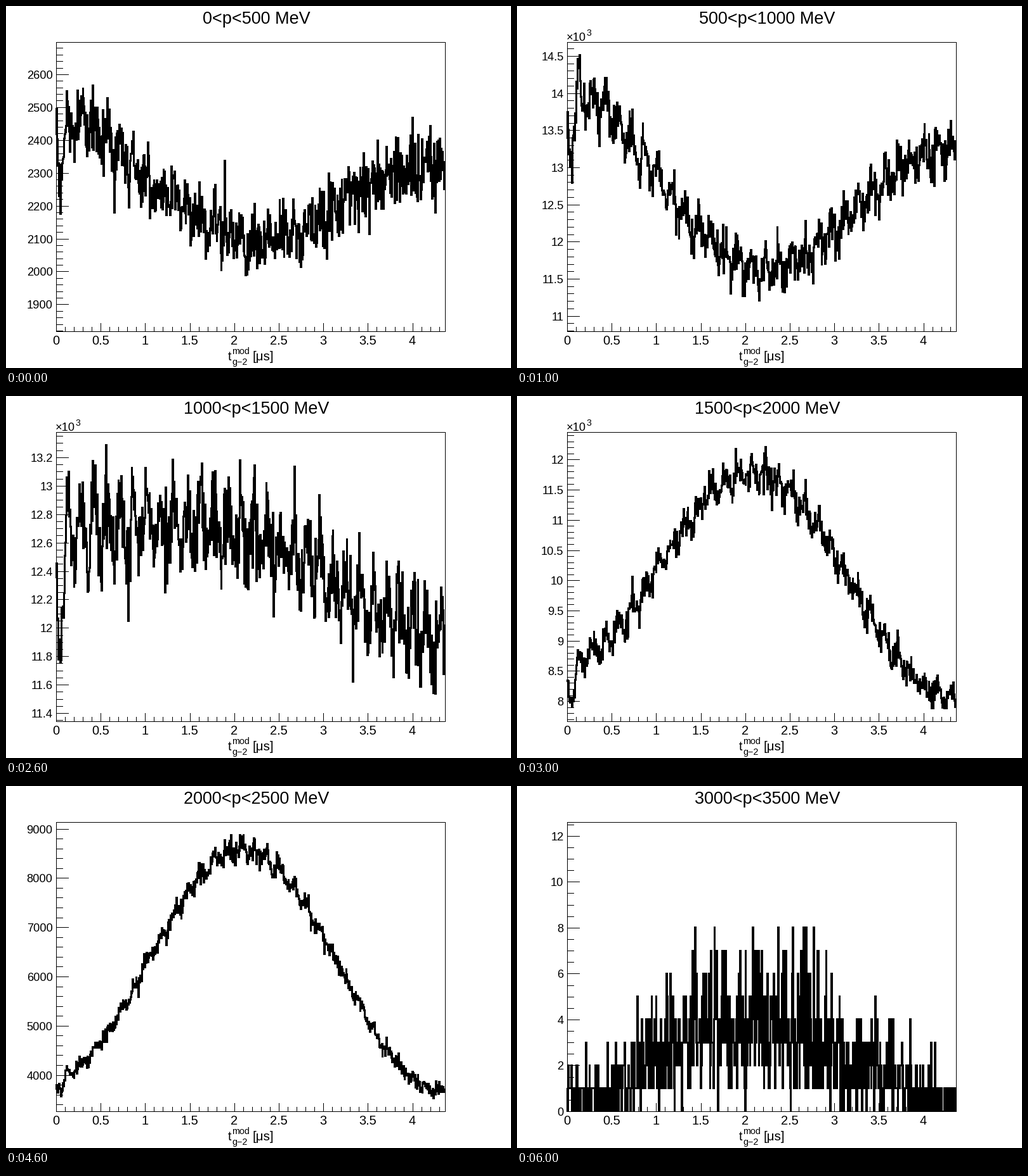
These frames come from a looping animation (796 px wide and 572 px high, 7 s). A matplotlib script:

```python
import math

import numpy as np
import matplotlib
import matplotlib.pyplot as plt
from matplotlib.animation import FuncAnimation

matplotlib.rcParams["path.simplify"] = False

W, H, DPI = 796, 572, 100
LEFT, RIGHT, TOP, BOTTOM = 79, 692, 57, 514
PX_PER_US = 140.4
BINS = 700

# Times in microseconds
LIFETIME = 64.4
WIGGLE_PERIOD, WIGGLE_START = 4.365, -0.06
TURN_PERIOD, TURN_PEAK = 0.1492, 0.132

# Per momentum slice: lowest and highest count, mean level, wiggle amplitude
SLICES = [
    (1858, 2658, 2323, 0.067),
    (10970, 14510, 13050, 0.08),
    (11435, 13285, 12920, -0.013),
    (7883, 12237, 10380, -0.171),
    (3529, 8868, 6400, -0.385),
    (692, 3655, 2205, -0.64),
    (0, 12, 2.5, -0.7),
]

EDGES = np.linspace(LEFT, RIGHT, BINS + 1)
TIME = ((EDGES[:-1] + EDGES[1:]) / 2 - LEFT) / PX_PER_US


def beam_shape():
    """Decay, start-up and revolution structure common to all slices."""
    rng = np.random.default_rng(11)
    start_up = 1 - 0.055 * np.clip((0.13 - TIME) / 0.08, 0, 1)
    turns = np.cos(2 * np.pi * (TIME - TURN_PEAK) / TURN_PERIOD)
    ripple = 1 + 0.013 * (1 + np.exp(-TIME / 0.4)) * turns
    jitter = 1 + 0.008 * rng.normal(size=BINS)
    return np.exp(-TIME / LIFETIME) * start_up * ripple * jitter


BEAM = beam_shape()


def counts(i):
    low, high, level, amplitude = SLICES[i]
    phase = 2 * np.pi * (TIME - WIGGLE_START) / WIGGLE_PERIOD
    mean = level * (1 + amplitude * np.cos(phase)) * BEAM
    noisy = np.random.default_rng(40 + i).poisson(mean)
    return np.clip(noisy, low, high)


def axis_range(low, high):
    margin = 0.05 * (high - low)
    return max(0, low - margin), high + margin


def nice_step(span):
    """Smallest round step giving about ten divisions, and its subdivision."""
    raw = span / 10.5
    power = 10 ** math.floor(math.log10(raw))
    digit = next(d for d in (1, 2, 5, 10) if d * power >= raw)
    return digit * power, 4 if digit == 2 else 5


fig = plt.figure(figsize=(W / DPI, H / DPI), dpi=DPI, facecolor="white")
ax = fig.add_axes([0, 0, 1, 1])


def text(x, baseline, s, px, ha="left"):
    ax.text(x, baseline, s, fontsize=px * 72 / DPI, ha=ha, va="baseline",
            family="Liberation Sans", color="black")


def line(xs, ys, px=1):
    ax.plot(xs, ys, color="black", lw=px * 72 / DPI, antialiased=False,
            solid_joinstyle="miter", solid_capstyle="butt")


def draw_x_axis():
    for k in range(44):
        x = LEFT + k * 0.1 * PX_PER_US
        line([x, x], [BOTTOM, BOTTOM - (13 if k % 5 == 0 else 7)])
        if k % 5 == 0:
            text(x, 535, f"{k / 10:g}", 20, "center")
    text(350, 560, "t", 20)
    text(356, 550.5, "mod", 14.3)
    text(356, 567, "g\u22122", 14.3)
    text(388.5, 560, "[\u03bcs]", 20.5)


def draw_y_axis(bottom, top, to_px):
    major, parts = nice_step(top - bottom)
    minor = major / parts
    unit = 1000 if top > 10000 else 1
    for k in range(math.ceil(bottom / minor), math.floor(top / minor) + 1):
        y = to_px(k * minor)
        is_major = k % parts == 0
        line([LEFT, LEFT + (19 if is_major else 10)], [y, y])
        if is_major:
            text(73.5, y + 7, f"{k * minor / unit:g}", 18.3, "right")
    if unit > 1:
        text(78, 55, "\u00d710", 18.3)
        text(109, 47, "3", 14)


def draw(i):
    bottom, top = axis_range(*SLICES[i][:2])

    def to_px(value):
        return TOP + (top - value) / (top - bottom) * (BOTTOM - TOP)

    ax.cla()
    ax.set(xlim=(0, W), ylim=(H, 0))
    ax.axis("off")
    text(394.5, 28, f"{500 * i}<p<{500 * (i + 1)} MeV", 27, "center")
    line([LEFT, RIGHT, RIGHT, LEFT, LEFT], [TOP, TOP, BOTTOM, BOTTOM, TOP])
    draw_x_axis()
    draw_y_axis(bottom, top, to_px)
    line(np.repeat(EDGES, 2)[1:-1], np.repeat(to_px(counts(i)), 2), 2)
    return ax.lines


anim = FuncAnimation(fig, draw, frames=len(SLICES), init_func=lambda: draw(0),
                     interval=1000, repeat=True, repeat_delay=0, blit=False)
plt.show()
```
